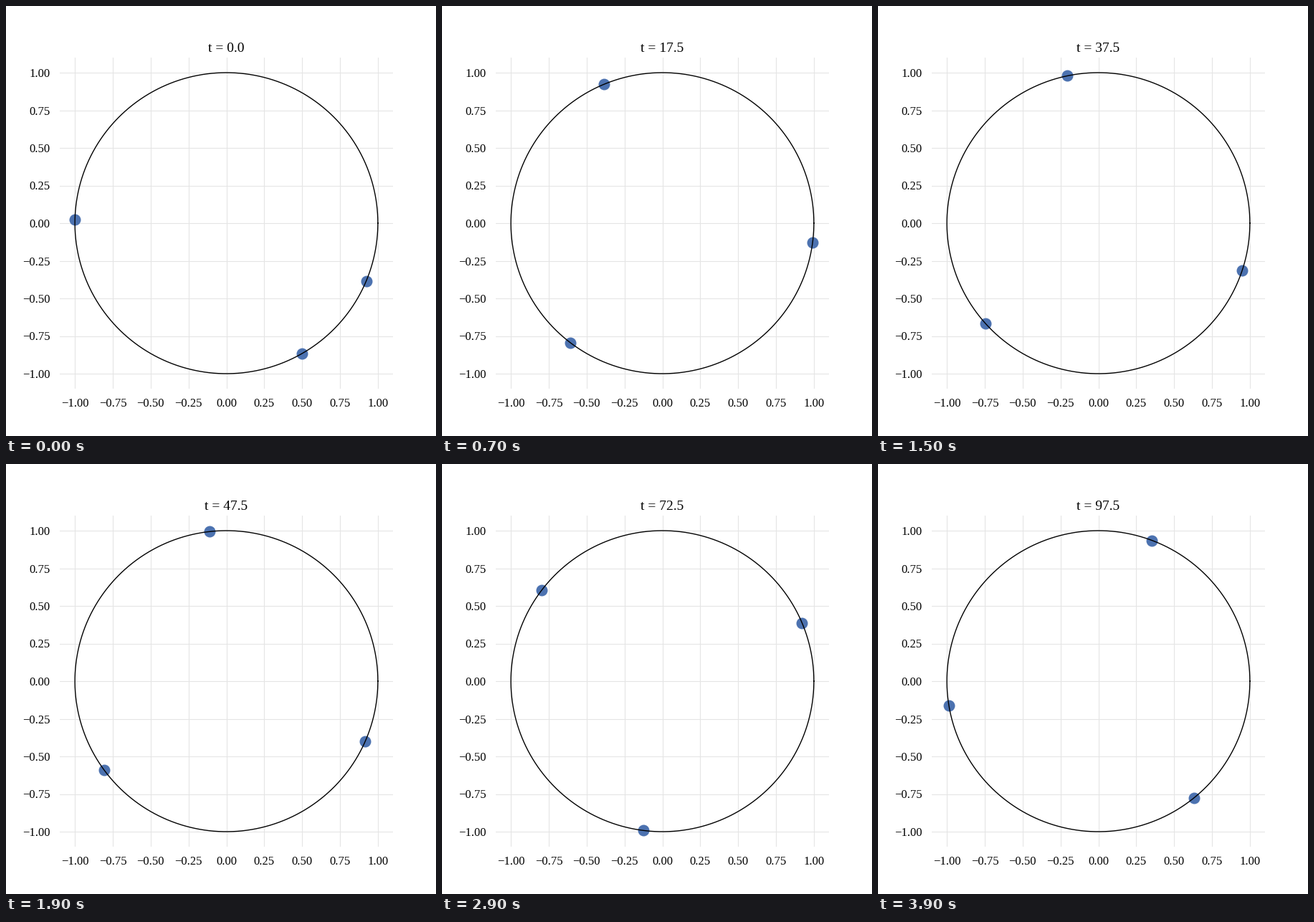
A matplotlib script that plays this animation: 600x600 px, repeating every 4 s.

```python
import numpy as np
import matplotlib.pyplot as plt
from matplotlib.animation import FuncAnimation

FRAMES = 40
STEP = 2.5        # model time per frame
SUBSTEPS = 50
OMEGA = 0.2       # shared natural frequency
COUPLING = -1.0   # repulsive: phases spread evenly
START = np.radians([178.7, -22.6, -60.0])


def velocity(theta):
    pull = np.sin(theta[None, :] - theta[:, None]).mean(axis=1)
    return OMEGA + COUPLING * pull


def rk4(theta, dt):
    k1 = velocity(theta)
    k2 = velocity(theta + dt / 2 * k1)
    k3 = velocity(theta + dt / 2 * k2)
    k4 = velocity(theta + dt * k3)
    return theta + dt / 6 * (k1 + 2 * k2 + 2 * k3 + k4)


def simulate():
    theta = START
    path = [theta]
    for _ in range(FRAMES - 1):
        for _ in range(SUBSTEPS):
            theta = rk4(theta, STEP / SUBSTEPS)
        path.append(theta)
    return np.array(path)


phases = simulate()

plt.rcParams["font.family"] = "Liberation Serif"
fig, ax = plt.subplots(figsize=(6, 6), dpi=100)
fig.subplots_adjust(left=0.125, right=0.9, bottom=0.11, top=0.88)
ax.set(xlim=(-1.1, 1.1), ylim=(-1.1, 1.1))

ticks = np.arange(-1, 1.01, 0.25)
ax.set_xticks(ticks)
ax.set_yticks(ticks)
ax.xaxis.set_major_formatter("{x:.2f}")
ax.yaxis.set_major_formatter("{x:.2f}")
ax.tick_params(length=0, pad=9.5, labelsize=12)
ax.spines[:].set_visible(False)
ax.set_axisbelow(True)
ax.grid(color="#e5e5e5", linewidth=0.8)

turn = np.linspace(0, 2 * np.pi, 400)
ax.plot(np.cos(turn), np.sin(turn), color="black", linewidth=1, zorder=2)
dots = ax.scatter(np.cos(START), np.sin(START), s=100, color="#4c72b0",
                  linewidth=1.5, zorder=1)
title = ax.set_title("t = 0.0", fontsize=14, pad=6)


def update(i):
    theta = phases[i]
    dots.set_offsets(np.column_stack([np.cos(theta), np.sin(theta)]))
    title.set_text(f"t = {i * STEP:.1f}")
    return dots, title


anim = FuncAnimation(fig, update, frames=FRAMES, interval=100,
                     repeat=True, repeat_delay=0, blit=False)
plt.show()
```
